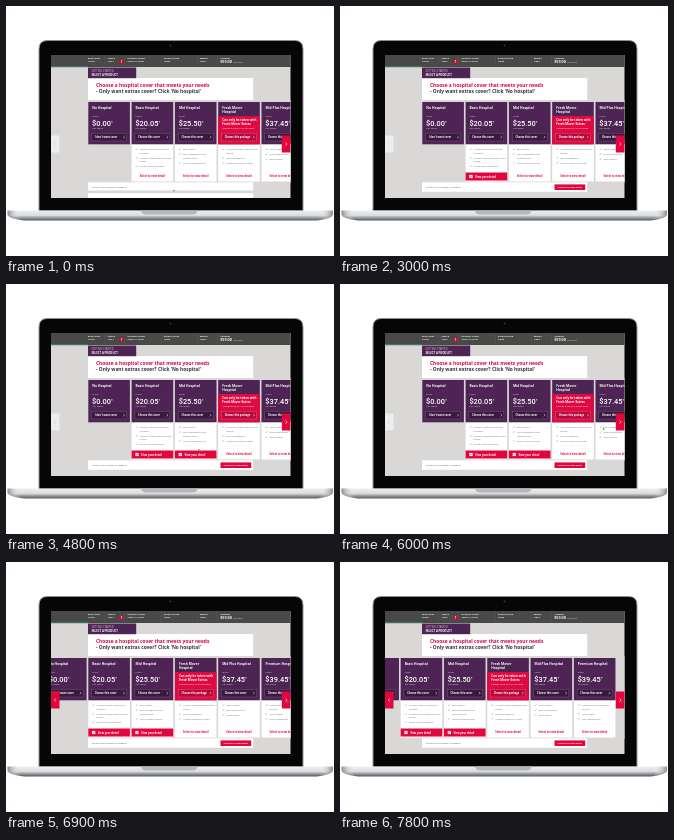
Recreate the animation shown at these times as an HTML page. Size 328 by 250 pixels, loop 8000 ms.

```html
<!DOCTYPE html>
<html lang="en">
<head>
<meta charset="utf-8">
<title>Hospital cover picker</title>
<style>
html, body { margin: 0; width: 100%; height: 100%; overflow: hidden; background: #fff; }
svg { display: block; width: 328px; height: 250px; }
text { font-family: "Open Sans", "Liberation Sans", sans-serif; }
.price { font-family: Roboto, "Liberation Sans", sans-serif; font-weight: 500; }
</style>
</head>
<body>
<svg id="stage" viewBox="0 0 328 250" xmlns="http://www.w3.org/2000/svg">
  <defs>
    <linearGradient id="metal" x1="0" y1="0" x2="0" y2="1">
      <stop offset="0" stop-color="#eeeff0"/>
      <stop offset=".5" stop-color="#d9dbdd"/>
      <stop offset=".62" stop-color="#b4b7ba"/>
      <stop offset="1" stop-color="#54585c"/>
    </linearGradient>
    <linearGradient id="side" x1="0" y1="0" x2="1" y2="0">
      <stop offset="0" stop-color="#777" stop-opacity=".8"/>
      <stop offset=".04" stop-color="#fff" stop-opacity="0"/>
      <stop offset=".96" stop-color="#fff" stop-opacity="0"/>
      <stop offset="1" stop-color="#777" stop-opacity=".8"/>
    </linearGradient>
    <clipPath id="screen"><rect x="45" y="49" width="239.500" height="143"/></clipPath>
  </defs>
  <g id="laptop"></g>
  <g clip-path="url(#screen)">
    <g id="page"></g>
    <g id="cards"></g>
    <g id="over"></g>
  </g>
</svg>
<script>
const NS = "http://www.w3.org/2000/svg";
const LOOP = 8000, STEP = 300;
const PITCH = 43.3, CARD_W = 41.6, FIRST_X = 82.3;
const PURPLE = "#4d2453", RED = "#e3063c", GREY = "#d9d8d7";
const $ = id => document.getElementById(id);

function add(parent, tag, attrs, content) {
  const node = document.createElementNS(NS, tag);
  for (const key in attrs) node.setAttribute(key, attrs[key]);
  if (content !== undefined) node.textContent = content;
  parent.appendChild(node);
  return node;
}
const rect = (p, x, y, width, height, fill, more) =>
  add(p, "rect", { x, y, width, height, fill, ...more });
const label = (p, x, y, size, fill, content, more) =>
  add(p, "text", { x, y, "font-size": size, fill, ...more }, content);
const path = (p, d, stroke, width) =>
  add(p, "path", { d, fill: "none", stroke, "stroke-width": width });
const group = p => add(p, "g", {});
const show = (node, on) => node.setAttribute("visibility", on ? "visible" : "hidden");
const BOLD = { "font-weight": 700 };
const MID = { "font-weight": 700, "text-anchor": "middle" };

function drawLaptop(p) {
  add(p, "path", { d: "M33 205V43Q33 34.5 41.500 34.5H288.500Q297 34.5 297 43V205Z",
    fill: "#060607", stroke: "#8d9092", "stroke-width": 1 });
  add(p, "circle", { cx: 164.5, cy: 39.5, r: 1, fill: "#34373b" });
  const base = "M1.500 204.500H327V209Q325 212.500 311 214.500H18Q3.500 212.500 1.500 209Z";
  add(p, "path", { d: base, fill: "url(#metal)" });
  add(p, "path", { d: base, fill: "url(#side)" });
  add(p, "path", { d: "M135 204.500H191.500Q191 208.500 186 208.500H140.500Q135.500 208.500 135 204.500Z", fill: "#b5b8bb" });
}

function drawPage(p) {
  rect(p, 45, 49, 240, 143, GREY);
  rect(p, 45, 49, 240, 12, "#474a46");
  rect(p, 45, 60.700, 37, .8, "#6fb3ad");
  const info = [
    [82, "BACK TO MY", "COVER"], [101.500, "SINGLE", "TYPE 1"],
    [121.500, "HOSPITAL COVER", "SELECT A COVER"], [158, "EXTRAS COVER", "NONE"],
    [194, "REBATE", "TIER 0"], [214.500, "PAYMENT", ""]
  ];
  for (const [x, top, low] of info) {
    label(p, x, 53, 2.1, "#fff", top, BOLD);
    label(p, x, 55.7, 2.1, "#eee", low, BOLD);
  }
  label(p, 214.200, 57, 3.7, "#fff", "$59.00", BOLD);
  label(p, 227.500, 56.8, 2.2, "#ddd", "per week");
  for (const x of [98.5, 118.5, 155, 191, 211.5]) rect(p, x, 50, .4, 10, "#5b5e5c");
  rect(p, 113.300, 53.800, 4.200, 3.600, RED);
  label(p, 115.400, 56.500, 2.5, "#fff", "1", MID);

  rect(p, 82, 72, 165.200, 24, "#fff");
  rect(p, 82, 61.5, 48.200, 10.700, PURPLE);
  label(p, 85.500, 66, 2.6, "#cdbfd0", "GETTING STARTED");
  label(p, 85.500, 69.7, 2.8, "#fff", "SELECT A PRODUCT", BOLD);
  label(p, 90, 80.700, 4.86, "#d10a4c", "Choose a hospital cover that meets your needs", BOLD);
  label(p, 90, 87.300, 4.83, "#37303a", "- Only want extras cover? Click 'No hospital'", BOLD);
  rect(p, 45, 94, 240, 83, GREY);
}

const plans = [
  { name: ["No Hospital"], price: "$0.00", button: "I don't want cover" },
  { name: ["Basic Hospital"], price: "$20.05", button: "Choose this cover", pickAt: 2400, items: [
    ["Accident related hospital and", "transport"], ["Accident related treatment after", "joining"], ["Dental related treatment"]] },
  { name: ["Mid Hospital"], price: "$25.50", button: "Choose this cover", pickAt: 4500, items: [
    ["Back surgery"], ["Joint investigations and", "reconstruction"], ["Cancer related services"]] },
  { name: ["Fresh Mover", "Hospital"], special: true, button: "Choose this package", items: [
    ["Accident related treatment after", "joining"], ["Joint investigations"], ["Surgical treatment of teeth"]] },
  { name: ["Mid Plus Hospital"], price: "$37.45", button: "Choose this cover", items: [
    ["Heart surgery"], ["Joint replacements"], ["Renal dialysis"]] },
  { name: ["Premium Hospital"], price: "$39.45", button: "Choose this cover", items: [
    ["Pregnancy and birth related", "services"], ["Heart surgery"], ["Joint replacements"]] }
];
const firstPick = plans[1].pickAt;

function drawBody(g, plan) {
  rect(g, 0, 138, CARD_W, 37.500, "#fff");
  let y = 144;
  for (const lines of plan.items) {
    path(g, `M4 ${y - .8}l.7 .7l1.200 -1.600`, "#55a5a0", .45);
    for (const line of lines) {
      label(g, 8, y, 2.15, "#666", line);
      y += 3.7;
    }
    y += 1.2;
  }
  plan.idle = label(g, CARD_W / 2, 171, 2.55, RED, "Select to view detail", MID);
  if (!plan.pickAt) return;
  plan.picked = group(g);
  rect(plan.picked, 0, 166.500, CARD_W, 8, RED);
  rect(plan.picked, 3.8, 168.9, 3.2, 3.2, "#fff");
  path(plan.picked, "M4.600 170.500l.7 .7l1.200 -1.500", RED, .5);
  label(plan.picked, 9.5, 171.5, 2.6, "#fff", "View your detail", BOLD);
}

function drawCard(plan, i) {
  const g = add($("cards"), "g", { transform: `translate(${FIRST_X + i * PITCH} 0)` });
  if (plan.items) drawBody(g, plan);
  rect(g, 0, 96, CARD_W, 42.300, PURPLE);
  if (plan.special) rect(g, 0, 110, CARD_W, 28.300, "#e00a43");
  plan.name.forEach((line, n) => label(g, 4, 103.200 + n * 4, 3.3, "#fff", line, BOLD));
  if (plan.special) {
    label(g, 4, 115.200, 3, "#fff", "Can only be taken with", BOLD);
    label(g, 4, 119.200, 3, "#fff", "Fresh Mover Extras", BOLD);
    label(g, 4, 123.4, 2.3, "#fff", "Savings from $19.45 per week");
  } else {
    label(g, 4, 111, 2.5, "#e6dde7", "From");
    const price = label(g, 3.8, 119.7, 7.4, "#fff", plan.price, { class: "price" });
    add(price, "tspan", { "font-size": 4, dy: -1.8 }, "*");
    label(g, 4, 123.200, 2.5, "#e6dde7", "Per week");
  }
  rect(g, 3.300, 127.200, 35, 7.800, plan.special ? "#b50a3a" : "#3a193f",
    { stroke: plan.special ? "#e8668a" : "#7d6182", "stroke-width": .4 });
  label(g, 6.500, 132, 2.5, "#fff", plan.button, BOLD);
  path(g, "M35 130l1.200 1.200l-1.200 1.200", "#fff", .5);
}

function arrow(p, x, dir, fill, stroke) {
  const g = group(p);
  rect(g, x, 129.500, 9, 17, fill);
  path(g, `M${x + 4.500 - dir * .8} 136.400l${dir * 1.600} 1.600l${-dir * 1.600} 1.600`, stroke, .6);
  return g;
}

drawLaptop($("laptop"));
drawPage($("page"));
plans.forEach(drawCard);

const over = $("over");
const leftOff = arrow(over, 44.5, -1, "#eeeded", "#ccc");
const leftOn = arrow(over, 44.5, -1, RED, "#fff");
arrow(over, 275.800, 1, RED, "#fff");

// The footer grows when its button appears and pushes the next panel off screen.
const footer = rect(over, 82, 176.300, 165.200, 9, "#fff");
label(over, 86, 182, 2.4, "#555", "What's not included in category");
const nextPanel = rect(over, 82, 187.200, 165.200, 5, "#fff");
const detail = group(over);
rect(detail, 214.500, 178.400, 30.700, 5.600, RED);
label(detail, 229.800, 182.100, 2.3, "#fff", "Choose to view detail", MID);
const pointer = add(over, "path", { d: "M0 0L2.100 1.600L1.100 1.700L.6 2.600Z",
  fill: "#222", stroke: "#fff", "stroke-width": .2 });

const clamp = v => Math.min(1, Math.max(0, v));
const progress = (t, from, to) => clamp((t - from) / (to - from));

// Stops of the pointer: arrival time, departure time, x, y.
const stops = [
  [0, 0, 167.300, 183.400], [1800, 2400, 131, 170],
  [4200, 4500, 174.500, 170], [6300, LOOP, 280.500, 138.500]
];
function pointerAt(t) {
  let i = stops.length - 1;
  while (t < stops[i][0]) i--;
  const [, leave, x, y] = stops[i];
  const [arrive, , nx, ny] = stops[i + 1] || stops[i];
  const k = t < leave ? 0 : progress(t, leave, arrive);
  return [x + (nx - x) * k, y + (ny - y) * k];
}

function render(time) {
  const t = Math.floor(time / STEP) * STEP;
  const shift = progress(t, 6300, 6900) + progress(t, 7500, 8100);
  $("cards").setAttribute("transform", `translate(${-shift * PITCH} 0)`);
  for (const plan of plans) {
    if (!plan.picked) continue;
    const on = t >= plan.pickAt;
    show(plan.picked, on);
    show(plan.idle, !on);
  }
  const chosen = t >= firstPick;
  show(leftOff, shift === 0);
  show(leftOn, shift > 0);
  show(detail, chosen);
  show(nextPanel, !chosen);
  footer.setAttribute("height", chosen ? 9.5 : 8.2);
  pointer.setAttribute("transform", `translate(${pointerAt(t)})`);
}

const start = performance.now();
function tick() {
  render((performance.now() - start) % LOOP);
  requestAnimationFrame(tick);
}
tick();
</script>
</body>
</html>
```
